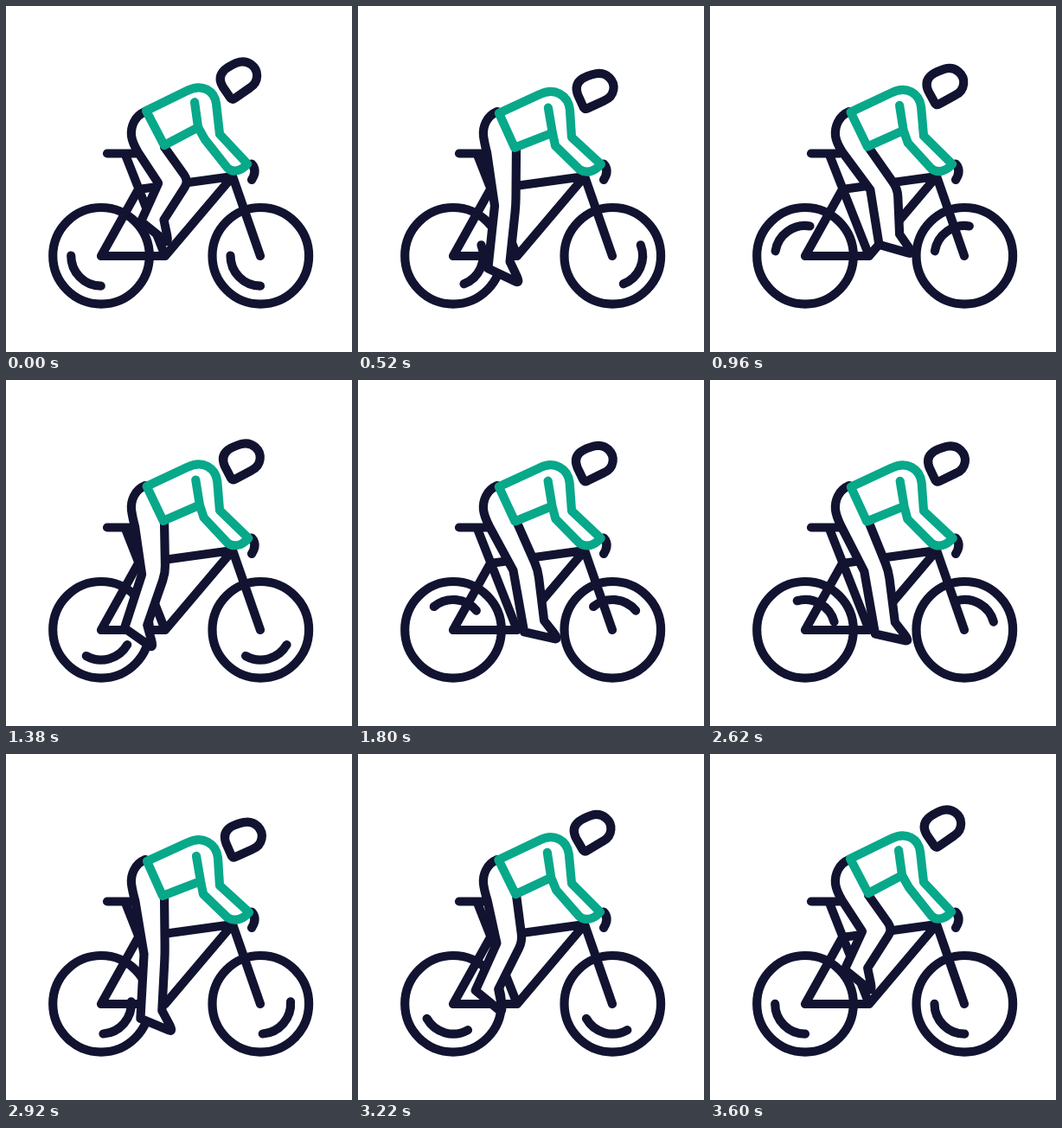
These frames come from a looping animation (400x400 px, 3620 ms). An HTML page:

```html
<!DOCTYPE html>
<html lang="en">
<head>
<meta charset="utf-8">
<title>Cyclist</title>
<style>
html, body { margin: 0; width: 100%; height: 100%; overflow: hidden; background: #fff; }
svg { display: block; width: 100vw; height: 100vh; }
.line { fill: none; stroke: #121331; stroke-width: 10.2; stroke-linecap: round; stroke-linejoin: round; }
#shirt { stroke: #08a88a; }
</style>
</head>
<body>
<svg viewBox="0 0 400 400">
  <g class="line">
    <circle cx="110" cy="288.8" r="55.8"/>
    <circle cx="294.300" cy="288.8" r="55.8"/>
    <path id="rear" d="M75.2 288.8A34.8 34.8 0 0 0 110 323.6"/>
    <path id="front" d="M259.5 288.8A34.8 34.8 0 0 0 294.3 323.6"/>
    <path d="M110 289L153 212L262 197L184 289H110M138 172L184 289M262 197L294 289M117 170.500H150"/>
    <path d="M284 182.5Q291 190 284 201"/>
    <path id="leg" fill="#fff"/>
    <path id="head" d="M259.500 106L250.500 93Q244 82 252 74Q257 69.500 266 65.500C279 60 290 70 290 80Q290 89 282 94L265 106Q262 108.500 259.500 106Z"/>
    <path id="shirt"/>
  </g>
</svg>
<script>
const LOOP = 3620, RIDE = 3.6, TURNS = 4;
const el = id => document.getElementById(id);
const mix = (a, b, k) => a.map((v, i) => v + (b[i] - v) * k);
const toward = (a, b, dist) => mix(a, b, dist / Math.hypot(b[0] - a[0], b[1] - a[1]));
const polar = ([x, y], r, a) => [x + r * Math.cos(a), y + r * Math.sin(a)];
const rad = deg => deg * Math.PI / 180;

// steady rate that joins smoothly into an ease-out ending at TURNS
function coast(t, rate, power) {
  const brake = (TURNS - rate * RIDE / power) / (rate - rate / power);
  if (t < brake) return rate * t;
  return TURNS - (TURNS - rate * brake) * ((RIDE - t) / (RIDE - brake)) ** power;
}

function legPath(crank, wave) {
  const hip = [183, 163], seat = [148, 162];
  const heel = polar([165.5, 277.5], 30, crank + rad(251));
  const pitch = rad(wave(27, 12, -8));
  const toe = polar(heel, 41.5, pitch);
  const ankle = polar(heel, 26.5, pitch - rad(42.7));
  const back = [wave(172, 4, 15), wave(217, -12, -8)];
  const knee = [wave(202, 9, 18), wave(215.5, -13, -8)];
  return `M161 122C149 127 144 139 145 150Q146 158 ${toward(seat, back, 8)}` +
    `L${back}L${heel}L${toward(toe, heel, 6)}Q${toe} ${mix(toe, ankle, .4)}L${ankle}` +
    `L${toward(knee, ankle, 9)}Q${knee} ${toward(knee, hip, 9)}L${hip}`;
}

// k is how far the upper body has dipped
function shirtPath(k) {
  const p = (x, y, dx, dy) => [x + dx * k, y + dy * k];
  const arm = p(222, 140, 3, 7), hand = p(279, 182.5, 2, .5);
  return `M${arm}L${p(183, 161, -2, 3)}L${p(162, 121, 1, 3)}L${p(210, 97.5, 0, 5)}` +
    `C${p(227, 89, 0, 5)} ${p(241, 98, 2, 5)} ${p(243, 113, 2, 7)}` +
    `L${p(247, 148, 0, 4)}L${hand}C${p(272, 191, 1, 1)} ${p(262, 193, 2, 1)} ${p(256, 187, 0, 2)}` +
    `L${p(230, 154, -2, 8)}L${arm}L${p(218, 111, 2, 7)}`;
}

function draw(ms) {
  const t = Math.min(ms % LOOP / 1000, RIDE);
  const spin = coast(t, 1.327, 2) * 360;
  const beat = coast(t, 1.3, 1.6) * 2 * Math.PI;
  const crank = beat + .28 * Math.sin(beat);
  const wave = (mid, c, s) => mid + c * Math.cos(crank) + s * Math.sin(crank);
  const dip = wave(.53, -.5, -.12);

  el("rear").setAttribute("transform", `rotate(${spin} 110 288.8)`);
  el("front").setAttribute("transform", `rotate(${spin} 294.3 288.8)`);
  el("leg").setAttribute("d", legPath(crank, wave));
  el("shirt").setAttribute("d", shirtPath(dip));
  el("head").setAttribute("transform", `translate(${5 * dip} ${14 * dip}) rotate(${11 * dip} 270 85)`);
}

const start = performance.now();
function tick() {
  draw(performance.now() - start);
  requestAnimationFrame(tick);
}
tick();
</script>
</body>
</html>
```
